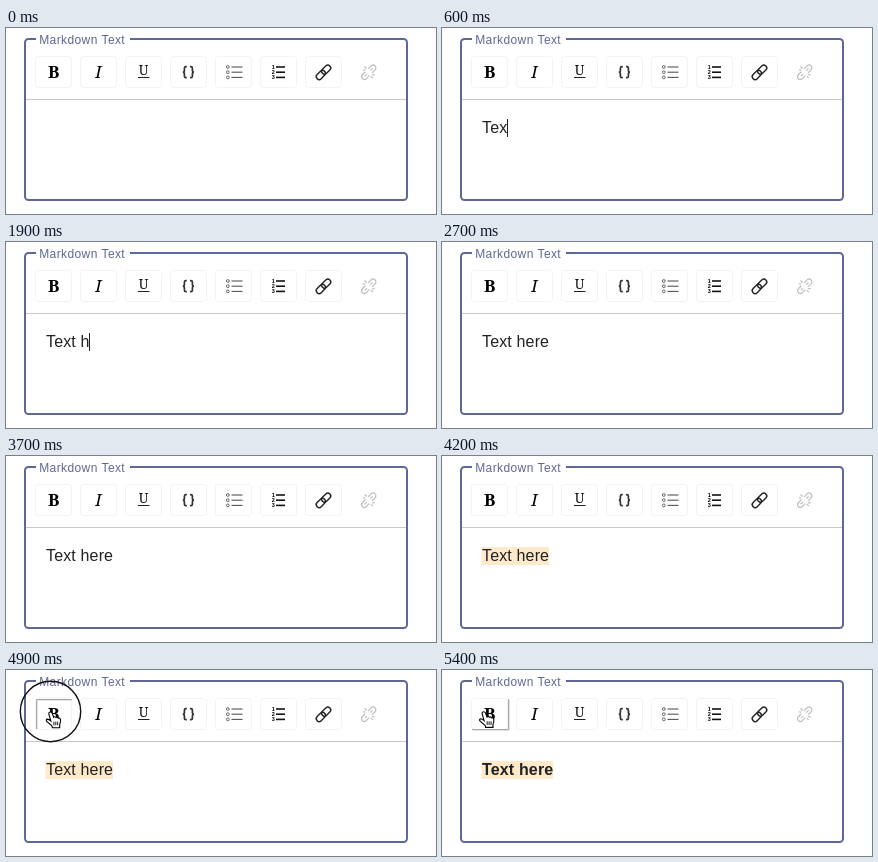
Recreate the animation shown at these times as an HTML page with a canvas. Size 430 px wide and 186 px high, loop 5.5 s.

```html
<!DOCTYPE html>
<html lang="en">
<head>
<meta charset="utf-8">
<title>Markdown editor</title>
<style>
html, body { margin: 0; width: 430px; height: 186px; overflow: hidden; background: #fff; }
canvas { display: block; }
</style>
</head>
<body>
<canvas id="stage" width="430" height="186"></canvas>
<script>
const ctx = document.getElementById('stage').getContext('2d');
const LOOP = 5500;
const SANS = '"Liberation Sans", Arial, sans-serif';
const SERIF = '"Noto Serif", "Liberation Serif", serif';
const ACCENT = '#5f6796';
const INK = '#222';

// [start time, text]
const TYPING = [[0, ''], [300, 'T'], [400, 'Te'], [600, 'Tex'], [900, 'Text'], [1100, 'Text '],
  [1900, 'Text h'], [2000, 'Text he'], [2100, 'Text her'], [2200, 'Text here']];
const CARET = [[0, false], [100, true], [1600, false], [1900, true], [2700, false],
  [3200, true], [3700, false]];
// [start time, cursor position]
const POINTER = [[0, null], [4400, [21, 47]], [4500, [26, 43]], [4600, [29.5, 41]],
  [4700, [34, 41]], [4800, [38, 41]], [4900, [39.5, 41.3]], [5400, [36.8, 41]]];

const at = (steps, t) => steps.filter(s => s[0] <= t).pop()[1];

function line(points, color, width = 1) {
  ctx.beginPath();
  points.forEach(([x, y]) => ctx.lineTo(x, y));
  ctx.strokeStyle = color;
  ctx.lineWidth = width;
  ctx.stroke();
}

function box(x, y, w, h, r, color, width = 1) {
  ctx.beginPath();
  ctx.roundRect(x, y, w, h, r);
  ctx.strokeStyle = color;
  ctx.lineWidth = width;
  ctx.stroke();
}

function label(text, x, y, font, color, spacing = 0, align = 'left') {
  ctx.font = font;
  ctx.letterSpacing = spacing + 'px';
  ctx.textAlign = align;
  ctx.fillStyle = color;
  ctx.fillText(text, x, y);
}

function path(d, fill, stroke, width = 1) {
  const p = new Path2D(d);
  if (fill) { ctx.fillStyle = fill; ctx.fill(p); }
  if (stroke) { ctx.strokeStyle = stroke; ctx.lineWidth = width; ctx.stroke(p); }
}

function local(x, y, angle, draw) {
  ctx.save();
  ctx.translate(x, y);
  ctx.rotate(angle);
  draw();
  ctx.restore();
}

function frame() {
  ctx.fillStyle = '#fff';
  ctx.fillRect(0, 0, 430, 186);
  box(19, 11, 382, 161, 3.5, ACCENT, 2);
  ctx.fillStyle = '#fff';
  ctx.fillRect(30, 8, 94, 6);
  label('Markdown Text', 33.2, 16, '12px ' + SANS, ACCENT, 0.4);
  line([[20, 71.5], [400, 71.5]], '#c8c8c8');
}

function buttons(hover, pressed) {
  for (let i = 0; i < 7; i++) box(29.5 + 45 * i, 28.5, 36, 31, 3, '#f3f3f3');
  if (pressed) {
    line([[30.5, 59], [30.5, 29.5], [66, 29.5]], '#aaa');
    line([[31.5, 59], [31.5, 30.5], [66, 30.5]], '#e2e2e2');
  } else if (hover) {
    line([[30, 59.5], [66.5, 59.5], [66.5, 29]], '#aaa');
    line([[31, 60.5], [67.5, 60.5], [67.5, 30]], '#e4e4e4');
  }
}

function icons() {
  label('B', 47.8, 50, '900 17px ' + SERIF, '#000', 0, 'center');
  label('I', 92.3, 50, 'italic 17px ' + SERIF, '#000', 0, 'center');
  label('U', 137.5, 47.3, '13.5px ' + SERIF, '#111', 0, 'center');
  line([[132, 49.5], [143.5, 49.5]], '#222');

  const brace = 'M-1.6 -5.5H-2.5Q-4 -5.5 -4 -4V-1.7Q-4 0 -5.6 0Q-4 0 -4 1.7V4Q-4 5.5 -2.5 5.5H-1.6';
  for (const turn of [0, Math.PI]) local(182.4, 44.2, turn, () => path(brace, null, '#333', 1.7));

  for (let i = 0; i < 3; i++) {
    const y = 39 + 5.2 * i;
    ctx.beginPath();
    ctx.arc(221.8, y, 1.4, 0, 7);
    ctx.strokeStyle = '#555';
    ctx.lineWidth = 0.9;
    ctx.stroke();
    line([[225.5, y], [236.5, y]], '#555', 1.1);
    label(i + 1, 267.2, y + 2, 'bold 5.5px ' + SANS, '#000', 0, 'center');
    line([[270, y], [279, y]], '#111', 1.6);
  }

  local(317.5, 44.3, -Math.PI / 4, () => {
    box(-9, -2.9, 10.5, 5.8, 2.9, '#222', 1.4);
    box(-1.5, -2.9, 10.5, 5.8, 2.9, '#222', 1.4);
  });

  local(362.7, 44.3, -Math.PI / 4, () => {
    const half = 'M2 -2.8H6.2A2.8 2.8 0 0 1 6.2 2.8H2M2.5 0H5.5M1.2 -4.2V-7M-0.8 -4L-2.4 -6';
    path(half, null, '#bdbdbd', 1.2);
    ctx.rotate(Math.PI);
    path(half, null, '#bdbdbd', 1.2);
  });
}

function content(t) {
  const text = at(TYPING, t);
  ctx.font = (t >= 5000 ? 'bold ' : '') + '16px ' + SANS;
  ctx.letterSpacing = '0.15px';
  const font = ctx.font;
  const width = ctx.measureText(text).width;
  if (t >= 4200) {
    ctx.fillStyle = '#fee9cb';
    ctx.fillRect(39.5, 91, width + 0.3, 18);
  }
  label(text, 40, 105, font, INK, 0.15);
  if (at(CARET, t)) {
    ctx.fillStyle = INK;
    ctx.fillRect(Math.floor(40 + width), 91, 1, 18);
  }
}

function pointer(t) {
  const pos = at(POINTER, t);
  if (!pos) return;
  local(pos[0], pos[1], 0, () => {
    if (t < 4500) {
      path('M0 0V13L3 10.3L5.2 15L7.3 14L5.2 9.5H9.3Z', '#000', '#fff');
      return;
    }
    path('M3.3 2.6Q3.4 .6 5 .7Q6.2 .7 6.8 2.2L8.2 6Q9.3 4.9 10.5 6.2Q12 5.4 12.8 6.9' +
      'Q14.5 6.4 15 8.4Q15.3 11 14.2 13.3V16.4H6.8L6.4 14.6L1.3 10.2Q0 8.3 1.8 7.8' +
      'Q3 7.7 5.3 9.6Z', '#fff', '#000', 1.1);
    for (const x of [8.4, 10.3, 12.2]) line([[x, 10.3], [x, 14]], '#000', 0.9);
  });
}

function draw(t) {
  const pressed = t >= 4900 && t < 5100;
  frame();
  buttons(t >= 4600, pressed);
  icons();
  content(t);
  pointer(t);
  if (pressed) {
    ctx.beginPath();
    ctx.arc(44.5, 41.5, 30.2, 0, 7);
    ctx.strokeStyle = '#111';
    ctx.lineWidth = 1.4;
    ctx.stroke();
  }
}

const start = performance.now();
function tick() {
  draw((performance.now() - start) % LOOP);
  requestAnimationFrame(tick);
}
tick();
</script>
</body>
</html>
```
